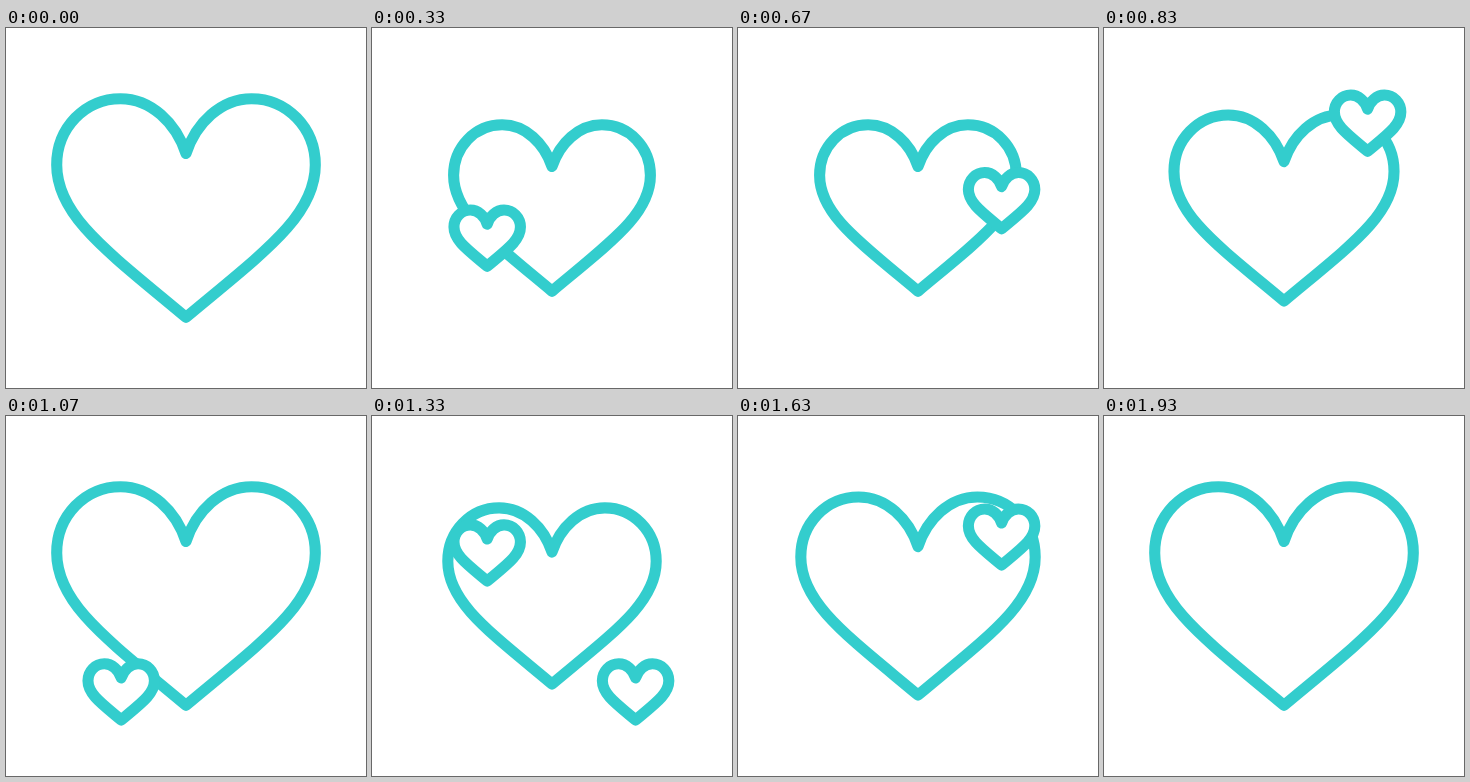
Animation, 360 px wide and 360 px high, one loop 2000 ms. Source, as an HTML page:

```html
<!DOCTYPE html>
<html lang="en">
<head>
<meta charset="utf-8">
<title>Hearts</title>
<style>
  html, body { margin: 0; width: 100%; height: 100%; overflow: hidden; background: #fff; }
  svg { display: block; width: 100vw; height: 100vh; }
  path {
    fill: #fff;
    stroke: #33cdcd;
    stroke-width: 11.1;
    stroke-linejoin: round;
    vector-effect: non-scaling-stroke;
  }
</style>
</head>
<body>
<svg viewBox="0 0 360 360"></svg>
<script>
const LOOP = 2000, FPS = 30;

// Heart outline around its own centre
const HEART = 'M0 -54.5 C10 -85 35 -109.3 65.5 -109.3 C101 -109.3 129.3 -80 129.3 -43' +
  ' C129.3 8 78 44 0 109.3 C-78 44 -129.3 8 -129.3 -43' +
  ' C-129.3 -80 -101 -109.3 -65.5 -109.3 C-35 -109.3 -10 -85 0 -54.5 Z';

// [step, scale] of the large heart
const BEAT = [[0, 1], [2, 1], [10, 0.761], [20, 0.761], [32, 1], [34, 1], [42.3, 0.761], [54, 1], [60, 1]];

// Small rising hearts
const RISERS = [
  { x: 115.2, start: 2 },
  { x: 263.6, start: 10 },
  { x: 115.2, start: 28 },
  { x: 263.6, start: 36 }
];
const RISE = 18, FADE = 3, FROM = 304.4, TO = 78.4, SMALL = 0.257;

const svg = document.querySelector('svg');
const clamp = v => Math.min(1, Math.max(0, v));
const ease = t => t * t * (3 - 2 * t);
const mix = (a, b, t) => a + (b - a) * t;

function addHeart() {
  const el = document.createElementNS('http://www.w3.org/2000/svg', 'path');
  el.setAttribute('d', HEART);
  return svg.appendChild(el);
}

function place(el, x, y, scale) {
  el.setAttribute('transform', `translate(${x} ${y}) scale(${scale})`);
}

function beatAt(step) {
  const i = BEAT.findIndex(key => key[0] > step);
  const [s0, v0] = BEAT[i - 1], [s1, v1] = BEAT[i];
  return mix(v0, v1, ease((step - s0) / (s1 - s0)));
}

const big = addHeart();
for (const r of RISERS) r.el = addHeart();

function draw(ms) {
  // Motion advances in whole steps
  const step = Math.floor((ms % LOOP + 4) * FPS / 1000) % 60;
  place(big, 180, 180, beatAt(step));
  for (const { el, x, start } of RISERS) {
    const age = step - start;
    place(el, x, mix(FROM, TO, ease(clamp(age / RISE))), SMALL);
    el.setAttribute('opacity', clamp(Math.min(age, RISE - age) / FADE));
  }
}

const begin = performance.now();
function tick() {
  draw(performance.now() - begin);
  requestAnimationFrame(tick);
}
tick();
</script>
</body>
</html>
```
